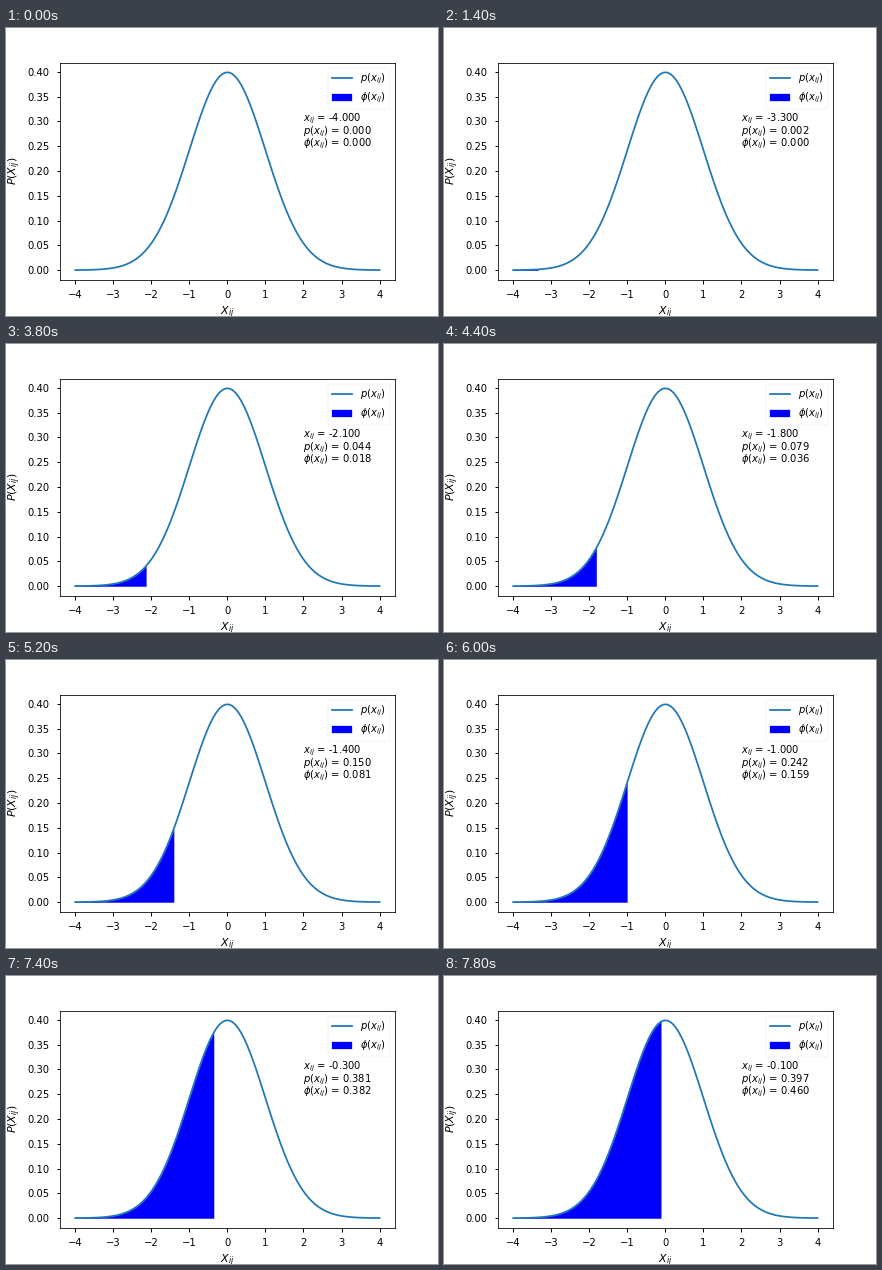
A matplotlib script that plays this animation: 432x288 px, repeating every 8000 ms.

```python
import math

import matplotlib.pyplot as plt
import numpy as np
from matplotlib.animation import FuncAnimation

FRAMES = 40
INTERVAL = 200
START, STEP = -4.0, 0.1

plt.rcParams.update({
    "font.family": "DejaVu Sans",
    "font.size": 10,
    "axes.labelsize": 11,
    "lines.linewidth": 1.75,
    "patch.linewidth": 0.3,
    "xtick.major.width": 1,
    "ytick.major.width": 1,
    "xtick.major.pad": 7,
    "ytick.major.pad": 7,
})


def pdf(x):
    return np.exp(-x ** 2 / 2) / math.sqrt(2 * math.pi)


def cdf(x):
    return (1 + math.erf(x / math.sqrt(2))) / 2


def area_under(right):
    """Closed outline of the region below the curve, up to `right`."""
    part = xs[xs <= right + 1e-9]
    top = np.column_stack([part, pdf(part)])
    return np.vstack([[part[0], 0], top, [part[-1], 0]])


xs = np.linspace(-4, 4, 100)

fig, ax = plt.subplots(figsize=(6, 4), dpi=72)
fig.subplots_adjust(left=0.125, right=0.9, bottom=0.125, top=0.88)

ax.plot(xs, pdf(xs), label=r"$p(x_{ij})$")
area = ax.fill_between(xs[:1], pdf(xs[:1]), color="blue",
                       label=r"$\phi(x_{ij})$")
ax.set_xlabel(r"$X_{ij}$")
ax.set_ylabel(r"$P(X_{ij})$")
ax.legend(loc="upper right")
readouts = [ax.text(2, y, "") for y in (0.3, 0.275, 0.25)]


def update(i):
    x = START + STEP * i
    area.set_verts([area_under(x)])
    names = (r"$x_{ij}$", r"$p(x_{ij})$", r"$\phi(x_{ij})$")
    for text, name, value in zip(readouts, names, (x, pdf(x), cdf(x))):
        text.set_text(f"{name} = {value:.3f}")
    return [area, *readouts]


anim = FuncAnimation(fig, update, frames=FRAMES, interval=INTERVAL,
                     init_func=lambda: update(0), repeat=True, repeat_delay=0)
plt.show()
```
